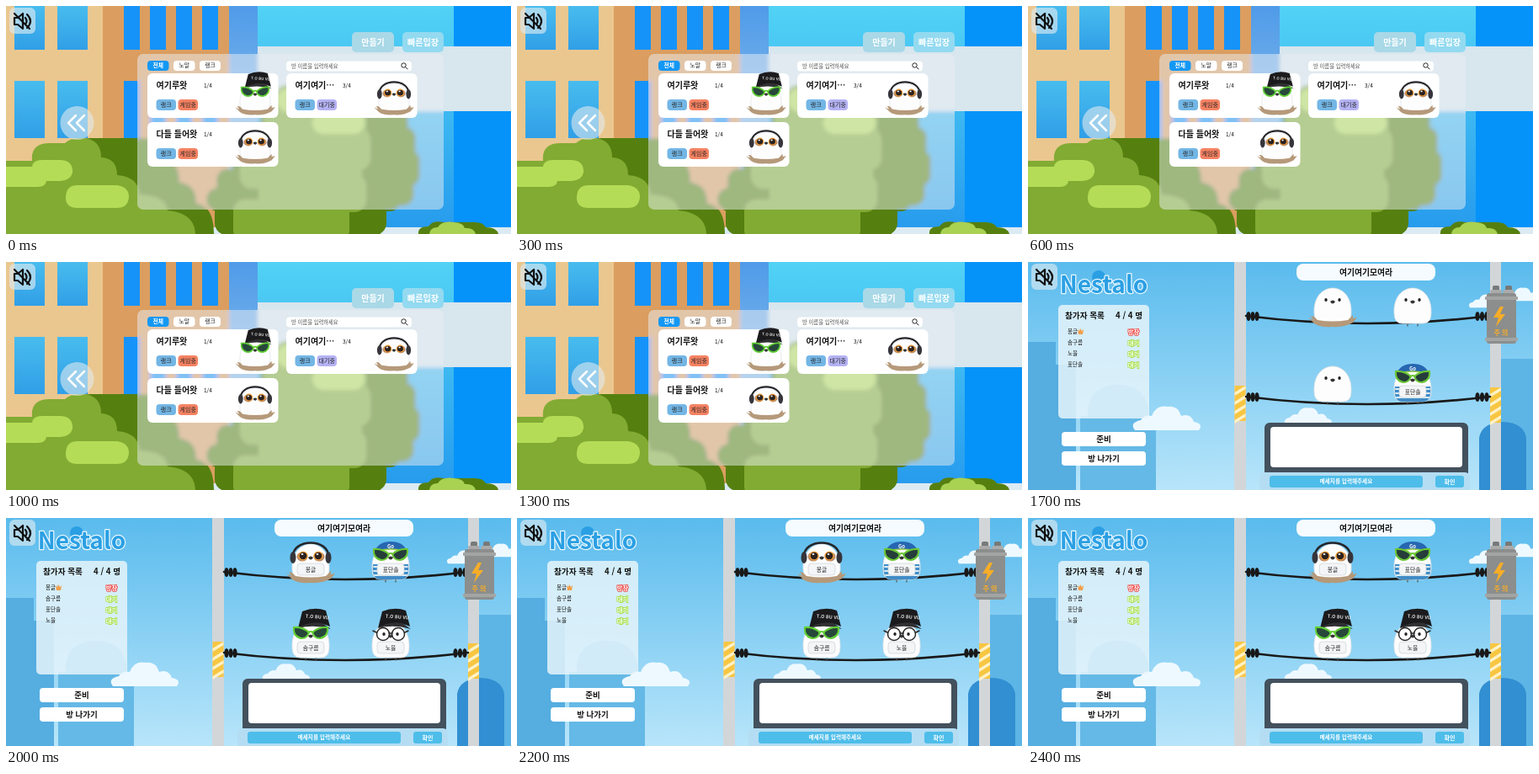
Write an HTML page that moves like this. It is 600 px wide and 271 px high and loops after 2.5 s.

```html
<!DOCTYPE html>
<html lang="ko">
<head>
<meta charset="utf-8">
<style>
html, body { margin: 0; width: 100%; height: 100%; overflow: hidden; background: #8fd4f6; }
svg { display: block; width: 100%; height: 100%; }
text { font-family: 'Noto Sans CJK KR', 'Noto Sans CJK', 'Noto Sans', sans-serif; }
</style>
</head>
<body>
<svg id="stage" viewBox="0 0 600 271"></svg>
<script>
const rect = (x, y, w, h, fill, r = 0, extra = '') =>
  `<rect x="${x}" y="${y}" width="${w}" height="${h}" rx="${r}" fill="${fill}" ${extra}/>`;
const path = (d, fill = 'none', extra = '') => `<path d="${d}" fill="${fill}" ${extra}/>`;
const oval = (x, y, rx, ry, fill, extra = '') =>
  `<ellipse cx="${x}" cy="${y}" rx="${rx}" ry="${ry}" fill="${fill}" ${extra}/>`;
const line = (d, color, w, extra = '') =>
  path(d, 'none', `stroke="${color}" stroke-width="${w}" stroke-linecap="round" stroke-linejoin="round" ${extra}`);
const text = (x, y, size, str, fill = '#111', weight = 500, anchor = 'start', extra = '') =>
  `<text x="${x}" y="${y}" font-size="${size}" fill="${fill}" font-weight="${weight}" text-anchor="${anchor}" ${extra}>${str}</text>`;
const pill = (x, y, w, h, fill, str, size, color, weight, r = 4) =>
  rect(x, y, w, h, fill, r) + text(x + w / 2, y + h / 2 + size * .36, size, str, color, weight, 'middle');
const group = (x, y, s, body) => `<g transform="translate(${x} ${y}) scale(${s})">${body}</g>`;
const each = (list, fn) => list.map(fn).join('');

// Birds: centred on 0,0 and about 44 wide
const bodyShape = 'M-22 10C-24-30 24-30 22 10Q22 22 12 22H-12Q-22 22-22 10Z';
const branch = path('M-29 15L-23 18L-26 13L-22 14L-18 18Q0 21 18 18L24 12L24 16L29 15L24 21Q14 27 0 26Q-16 27-22 22Z', '#b5997a');
const eyes = oval(-8, -6, 1.7, 1.9, '#222') + oval(8, -6, 1.7, 1.9, '#222');
const beak = path('M-3-4Q0-7 3-4Q0 1-3-4Z', '#333');
const cap = path('M-15-13L-10-33Q5-39 18-34L23-15Q4-24-15-13Z', '#1b1b1d') +
  path('M-15-13Q-1-22 14-19L24-12Q4-18-15-13Z', '#303033') +
  text(6, -25, 5.5, 'T.O BU VU', '#ddd', 600, 'middle', 'transform="rotate(4)"');
const shades = (frame, glass) => each([-1, 1], k =>
  path(`M${k * 2}-8Q${k * 10}-15 ${k * 20}-14Q${k * 21}-3 ${k * 11}-1Q${k * 4}-1 ${k * 2}-8Z`, glass,
    `stroke="${frame}" stroke-width="2"`)) + line('M-3-8Q0-10 3-8', frame, 2);

const outfits = {
  plain: eyes + beak,
  cap: cap + shades('#62cf35', '#27483a') + beak,
  round: cap + each([-1, 1], k => oval(k * 9, -6, 7.5, 7.5, '#fff', 'stroke="#292929" stroke-width="1.5"')) +
    line('M-2-7H2M-17-8L-21-10M17-8L21-10', '#292929', 1.4) + eyes + beak,
  phones: line('M-21-5C-22-27 22-27 21-5', '#26262b', 2.6) +
    each([-1, 1], k => oval(k * 21, -4, 3.5, 7, '#35353b') +
      oval(k * 10, -5, 6.5, 5.5, '#b98a66') +
      oval(k * 9, -6, 5, 4.8, '#2b211f', 'stroke="#f5a13a" stroke-width="1.3"') +
      oval(k * 9 - 1, -8, 1.4, 1.1, '#fff')) + beak,
  visor: path('M-21 4H21Q23 22 12 22H-12Q-23 22-21 4Z', '#418cc6') +
    line('M-20 7H20M-20 12H20M-19 17H19', '#d9edf6', 2) +
    path('M-19-11Q-15-23 0-23Q16-23 19-11Q0-17-19-11Z', '#2766b1') +
    line('M-19-11Q0-17 19-11', '#9ed24a', 1.5) +
    text(0, -15, 6, 'Go', '#fff', 800, 'middle') + shades('#6ac536', '#263d3b') + beak
};

function bird(x, y, s, kind, perch, name) {
  return group(x, y, s,
    line('M-6 21V25M6 21V25', '#555', 1.2) +
    path(bodyShape, '#fdfdfd', 'stroke="#d9dfe3" stroke-width=".8"') + outfits[kind] +
    (perch ? branch : '') +
    (name ? rect(-16, 3, 32, 14, '#f3f5f6', 4, 'stroke="#cbd3d8" stroke-width=".7"') +
      text(0, 12.5, 6.8, name, '#222', 500, 'middle') : ''));
}

const mute = rect(4, 2, 31, 31, '#dce9f0', 6, 'opacity=".65"') +
  path('M10 14H14L20 9V27L14 22H10Z', 'none', 'stroke="#111" stroke-width="2.2" stroke-linejoin="round"') +
  line('M23 14Q26 18 23 22M25 10Q33 18 25 26M10 9L28 27', '#111', 2.2);

// Lobby
const windows = each([[0, 52], [89, 68]], ([y, h]) =>
  each([10, 61], x => rect(x, y, 36, h, 'url(#glass)')) +
  each([140, 171, 202, 233], x => rect(x, y, 19, h, '#1693f8')));

const dark = '#558010', leaf = '#82ab33', bright = '#b5dc57';
const leaves = (color, boxes) => each(boxes, ([x, y, w, h]) => rect(x, y, w, h, color, Math.min(14, h / 2)));

const leftBush = path('M75 271V176Q82 157 101 157H166Q185 159 185 180Q207 183 206 209Q227 213 226 234Q247 238 247 271Z', dark) +
  path('M0 271V184H31Q29 163 52 163H70Q77 156 91 157Q113 158 113 180Q132 181 132 201Q158 203 158 224Q191 226 192 243Q224 246 225 271Z', leaf) +
  path('M0 215V191H31Q32 183 43 183H65Q80 184 79 198Q77 207 65 208H48Q47 215 38 215Z', bright) +
  path('M71 228Q71 213 85 213H132Q146 215 146 227Q145 240 132 240H85Q71 240 71 228Z', bright);

const middleBush = leaves(dark, [
    [320, 94, 130, 60], [302, 112, 176, 60], [275, 143, 212, 55], [268, 170, 224, 45],
    [250, 193, 235, 45], [238, 216, 232, 28], [248, 232, 204, 40], [256, 244, 189, 50]]) +
  leaves(leaf, [
    [320, 94, 90, 60], [306, 115, 122, 60], [285, 145, 148, 50], [278, 172, 145, 45],
    [300, 200, 128, 45], [270, 230, 138, 50]]) +
  leaves(bright, [[322, 98, 50, 28], [364, 126, 62, 26]]);

const scenery = rect(265, 0, 34, 271, 'url(#tower)') + rect(299, 0, 233, 271, 'url(#hall)') +
  rect(532, 0, 68, 271, '#0593fa') + rect(299, 48, 301, 77, '#d8e6ee') +
  rect(0, 0, 126, 271, '#eac78f') + rect(115, 0, 150, 271, '#db9e60') + windows +
  rect(0, 263, 600, 8, '#dbeaf3') + leftBush + middleBush +
  path('M490 271Q489 262 502 262Q507 254 520 257H557Q567 257 570 263Q583 263 585 271Z', dark) +
  path('M503 271Q504 263 513 263Q518 255 532 257Q544 258 545 264Q556 263 558 271Z', '#a9d152');

const card = (x, y, title, count, state, color, kind) =>
  rect(x, y, 155.5, 53, '#fff', 6) + text(x + 10.5, y + 18, 10, title, '#111', 900) +
  text(x + 67, y + 17, 6.5, count) +
  pill(x + 10.5, y + 31, 23.5, 13, '#73b6e5', '랭크', 7, '#222', 500) +
  pill(x + 36.5, y + 31, 23.5, 13, color, state, 7, '#222', 500) +
  bird(x + 128, y + 28, .82, kind, true);

const lobby = `<g id="scenery">${scenery}</g>
  <g clip-path="url(#panel)"><use href="#scenery" filter="url(#blur)"/></g>` +
  rect(156, 57, 364, 185, '#eaf0f4', 7, 'opacity=".5"') +
  pill(411, 31, 50, 24, '#a9d8e7', '만들기', 10, '#fff', 900, 5) +
  pill(471, 31, 49, 24, '#93daf0', '빠른입장', 10, '#fff', 900, 5) +
  pill(168, 65, 25.5, 12, '#1498f4', '전체', 6.8, '#fff', 600) +
  pill(199, 65, 25.5, 12, '#fff', '노말', 6.8, '#222', 500) +
  pill(230, 65, 25, 12, '#fff', '랭크', 6.8, '#222', 500) +
  rect(333, 65.5, 149, 12, '#fff', 4) + text(339, 74, 6.3, '방 이름을 입력하세요', '#555') +
  oval(472.5, 70.5, 2.7, 2.7, 'none', 'stroke="#222"') + line('M474.5 72.5L477 75', '#222', 1) +
  card(168, 80, '여기루왓', '1/4', '게임중', '#f58262', 'cap') +
  card(333, 80, '여기여기⋯', '3/4', '대기중', '#b5b2f4', 'phones') +
  card(168, 138, '다들 들어왓', '1/4', '게임중', '#f58262', 'phones') +
  oval(84.5, 139, 20, 20, '#e4edf0', 'opacity=".58"') +
  line('M83 130L74 139L83 148M93 130L84 139L93 148', '#fff', 2.5) + mute;

// Waiting room
const cloud = (x, y, s) => group(x, y, s,
  path('M-38 13Q-45 4-31 1Q-27-6-18-4Q-13-18 1-15Q13-17 17-4Q28-8 32 3Q44 5 38 13Z', '#eef9ff'));

const stripes = (x, y) => rect(x, y, 13, 42, '#f7c642') +
  each([0, 11, 22, 33], d => path(`M${x} ${y + d + 8}L${x + 13} ${y + d}V${y + d + 4}L${x} ${y + d + 12}Z`, '#fff2c7'));

const wire = y => line(`M259 ${y}Q402 ${y + 18} 549 ${y}`, '#191919', 2.6) +
  each([262, 267, 272, 534, 539.5, 545], x => oval(x, y + .5, 2.6, 5.5, '#191919'));

const city = rect(0, 0, 600, 271, 'url(#sky)') +
  rect(0, 95, 33, 176, '#55ade0') + rect(0, 122, 57, 149, '#55ade0') +
  path('M62 271V184H71V174Q75 149 101 146H113Q139 150 143 174V184H152V271Z', '#65b9e6') +
  line('M62 184H152M71 174H143', '#50aadd', 1) +
  rect(557, 115, 43, 156, '#5db5e5') +
  path('M536 271V209Q539 191 564 190Q589 191 592 209V271Z', '#318fd2') +
  cloud(165, 187, 1) + cloud(333, 184, .7) + cloud(546, 47, .55) + cloud(588, 39, .55);

const transformer = rect(552, 28, 8, 10, '#777a79', 2) + rect(567, 28, 8, 10, '#777a79', 2) +
  rect(549, 33, 14, 4, '#aaa', 2) + rect(564, 33, 14, 4, '#aaa', 2) +
  rect(545, 37, 35, 60, '#8b8e8c', 3) + rect(543, 41, 39, 4, '#a2a5a3', 1) + rect(543, 90, 39, 4, '#a2a5a3', 1) +
  path('M561 53L553 66H559L556 77L567 62H561L565 53Z', '#f8ad28') +
  text(562, 87, 8, '주 의', '#f8ad28', 800, 'middle');

const brand = oval(84, 18, 8, 8, '#2b9fe3') +
  text(90, 37, 28, 'Nestalo', '#2b9fe3', 900, 'middle',
    'stroke="#eaf8ff" stroke-width="2.5" paint-order="stroke" stroke-linejoin="round"');

const room = city + rect(245, 0, 14, 271, '#d3d6d8') + rect(549, 0, 13, 271, '#d3d6d8') +
  stripes(245.5, 147) + stripes(549, 149) + wire(64) + wire(160) + transformer + brand +
  rect(36, 51, 108, 135, '#e9f6fc', 5, 'opacity=".83"') +
  text(44, 66.5, 9.6, '참가자 목록', '#111', 800) + text(136, 66.5, 9.6, '4 / 4 명', '#111', 800, 'end') +
  pill(40, 202, 100, 17, '#fff', '준비', 9.5, '#111', 800) +
  pill(40, 225, 100, 17, '#fff', '방 나가기', 9.5, '#111', 800) +
  pill(319, 2, 165, 20, '#f5fbff', '여기여기모여라', 9.8, '#111', 700, 8) +
  rect(281, 191, 242, 70, '#43515d', 6) + rect(288, 196, 228, 48, '#fff', 4) +
  path('M281 250H519Q525 250 525 256V271H275V256Q275 250 281 250Z', '#b4ddf3') +
  pill(287, 254, 182, 14, '#4ebdea', '메세지를 입력해주세요', 6.6, '#fff', 600, 3) +
  pill(484, 254, 34, 14, '#4ebdea', '확인', 7, '#fff', 600, 3) + mute;

const [host, guest, late, fan] = ['몽글', '솜구름', '노을', '표단솔'];
const spots = [[362, 51], [457, 51], [362, 144], [457, 144]];

const roster = names => each(names, (name, i) => {
  const y = 85 + i * 13, color = i ? '#9bdc25' : '#ed403c';
  return text(47, y, 6.5, name) +
    text(125.5, y + .5, 7.3, i ? '대기' : '방장', '#fff', 800, 'middle',
      `stroke="${color}" stroke-width="1.5" paint-order="stroke"`);
}) + path('M59 80L61 82L62 79L64 82L66 80L65 86H60Z', '#f1a04c');

const flock = list => each(list, ([kind, name], i) => bird(...spots[i], 1, kind, i === 0, name));

const arriving = roster([host, guest, late, fan]) +
  flock([['plain'], ['plain'], ['plain'], ['visor', fan]]);
const settled = roster([host, guest, fan, late]) +
  flock([['phones', host], ['visor', fan], ['cap', guest], ['round', late]]);

const gradient = (id, a, b) => `<linearGradient id="${id}" x2="0" y2="1">
  <stop stop-color="${a}"/><stop offset="1" stop-color="${b}"/></linearGradient>`;

const stage = document.getElementById('stage');
stage.innerHTML = `<defs>${gradient('sky', '#5abbed', '#b8e5fa')}${gradient('tower', '#4f9be9', '#b4d3ea')}
  ${gradient('hall', '#52d2f5', '#259aed')}${gradient('glass', '#48bcee', '#309fe7')}
  <filter id="blur"><feGaussianBlur stdDeviation="2"/></filter>
  <clipPath id="panel">${rect(156, 57, 364, 185, '#fff', 7)}</clipPath></defs>
  <g id="lobby">${lobby}</g><g id="room">${room}
  <g id="arriving">${arriving}</g><g id="settled">${settled}</g></g>`;

const show = (id, on) => document.getElementById(id).style.display = on ? '' : 'none';

function draw() {
  const t = performance.now() % 2500;
  show('lobby', t < 1700);
  show('room', t >= 1700);
  show('arriving', t < 1900);
  show('settled', t >= 1900);
  requestAnimationFrame(draw);
}
draw();
</script>
</body>
</html>
```
